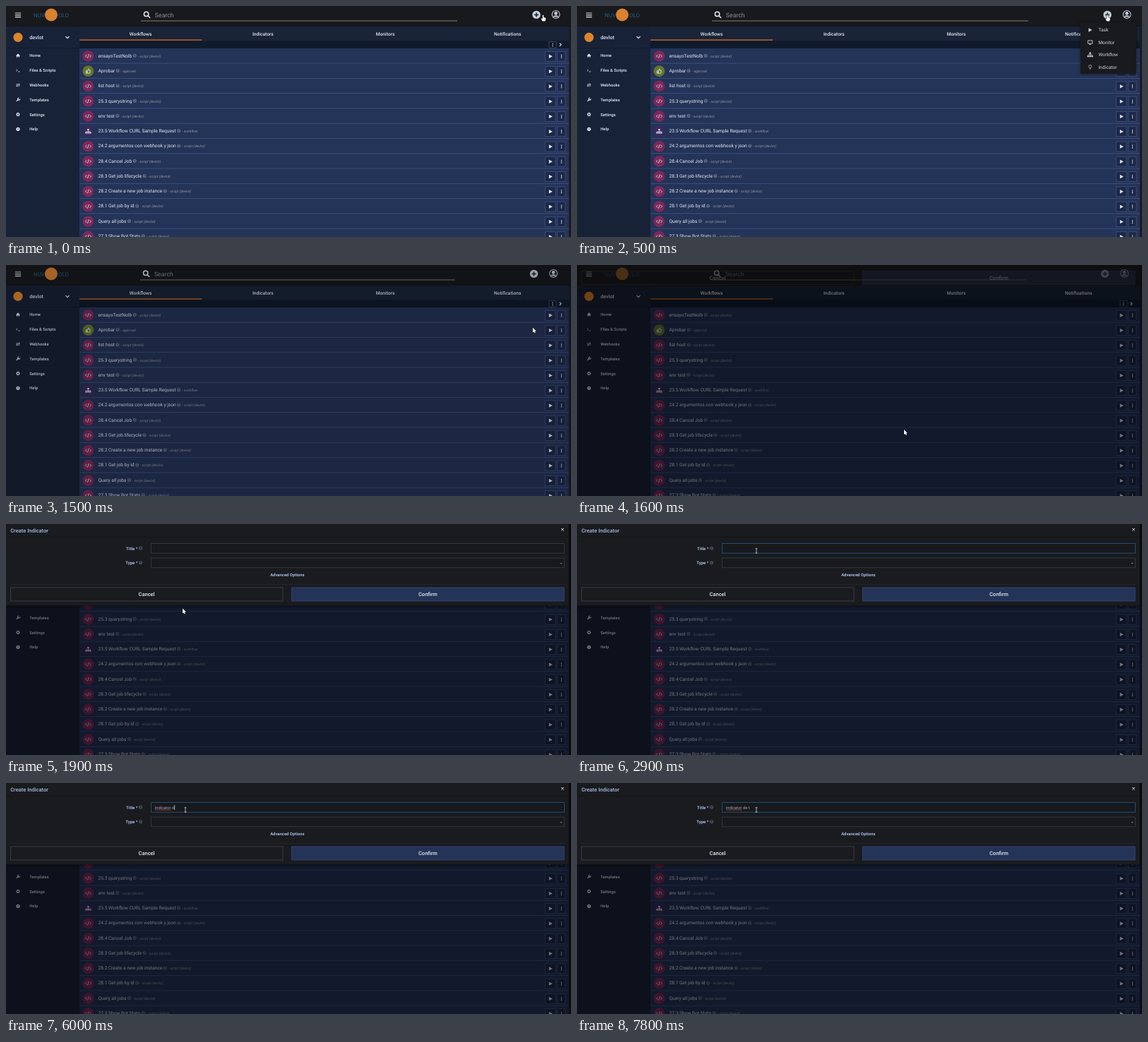
Animation, 800 px wide and 327 px high, one loop 8000 ms. Source, as an HTML page with a canvas:

```html
<!DOCTYPE html>
<html lang="es">
<meta charset="utf-8">
<title>Create Indicator</title>
<style>
html, body { margin: 0; width: 100%; height: 100%; overflow: hidden; background: #18191c }
canvas { display: block; width: 800px; height: 327px }
</style>
<canvas id="stage" width="800" height="327"></canvas>
<script>
const c = document.getElementById('stage').getContext('2d');
c.textRendering = 'geometricPrecision';
const LOOP = 8000, STEP = 100, WHITE = '#e3e8f2', ROW_H = 21.28;
const clamp = v => Math.max(0, Math.min(1, v));

const ROWS = [
  ['ensayoTestNolb'], ['Aprobar', 'approval'], ['list host'], ['25.3 querystring'], ['env test'],
  ['23.5 Workflow CURL Sample Request', 'workflow'], ['24.2 argumentos con webhook y json'],
  ['28.4 Cancel Job'], ['28.3 Get job lifecycle'], ['28.2 Create a new job instance'],
  ['28.1 Get job by id'], ['Query all jobs'], ['27.3 Show Bot Stats']
];
const KINDS = { script: '#7c2959', approval: '#66752f', workflow: '#3a2a5e' };

// Small icons, centred on 0,0
const ICON = {
  script: { d: 'M-2-2L-4 0L-2 2M2-2L4 0L2 2M.9-2.8L-.9 2.8', line: .8 },
  approval: { d: 'M-3.2-.4h1.6v3.4h-1.6zM-1.2-.4L.4-3.2Q1.7-3 .9-.9H3L2.4 3H-1.2z', line: .8 },
  workflow: { d: 'M-1.2-3.4h2.4v2.2h-2.4zM-4 1h2.2v2.2h-2.2zM-1.1 1h2.2v2.2h-2.2zM1.8 1h2.2v2.2h-2.2zM-3.2-.4h6.4v.6h-6.4zM-.3-1.3h.6V1h-.6z' },
  play: { d: 'M-2.2-2.7L2.8 0L-2.2 2.7z' },
  dots: { d: 'M-.6-2.5h1.2v1.2h-1.2zM-.6-.6h1.2v1.2h-1.2zM-.6 1.3h1.2v1.2h-1.2z' },
  home: { d: 'M0-2.7L3 0H2.1V2.4H.6V.8H-.6V2.4H-2.1V0H-3z' },
  prompt: { d: 'M-2.5-1.6L-.9 0L-2.5 1.6M0 1.9H2.7', line: .7 },
  swap: { d: 'M-2.5-1H2M1-2.2L2.4-1L1 .1M2.5 1.2H-2M-1 0L-2.4 1.2L-1 2.4', line: .8 },
  wrench: { d: 'M-2.2 2.2L.8-.8M2.6-1.2A1.5 1.5 0 1 1 1.2-2.5', line: 1.2 },
  gear: { d: 'M1.6 0A1.6 1.6 0 1 1-1.6 0A1.6 1.6 0 1 1 1.6 0M0-2.7V-2M0 2.7V2M-2.7 0H-2M2.7 0H2M-1.9-1.9L-1.3-1.3M1.9 1.9L1.3 1.3M1.9-1.9L1.3-1.3M-1.9 1.9L-1.3 1.3', line: 1.1 },
  monitor: { d: 'M-3.2-2.6H3.2V1.6H-3.2zM-1.4 2.8H1.4M0 1.6V2.8', line: .9 },
  bulb: { d: 'M-.8 1.2Q-2-.2-1.8-1.2A1.8 1.8 0 0 1 1.8-1.2Q2-.2.8 1.2zM-.8 2.2H.8M-.4 3H.4', line: .7 },
  down: { d: 'M-2.6-1.2L0 1.4L2.6-1.2', line: 1.2 },
  next: { d: 'M-1.2-2.2L1 0L-1.2 2.2', line: 1.1 },
  close: { d: 'M-1.6-1.6L1.6 1.6M1.6-1.6L-1.6 1.6', line: 1.1 },
  menu: { d: 'M-4.2-2.8H4.2M-4.2 0H4.2M-4.2 2.8H4.2', line: 1.2 },
  search: { d: 'M2.3-.9A3.2 3.2 0 1 1-4.1-.9A3.2 3.2 0 1 1 2.3-.9M1.4 1.5L4.6 4.6', line: 1.5 },
  plus: { d: 'M-3 0H3M0-3V3', line: 1.5 },
  beam: { d: 'M-1.4-3.2H1.4M-1.4 3.2H1.4M0-3.2V3.2', line: .8 }
};
for (const k in ICON) ICON[k].path = new Path2D(ICON[k].d);
const ARROW = new Path2D('M0 0V7.2L1.7 5.7L2.8 8L4 7.4L2.9 5.2H5.1z');
const HAND = new Path2D('M-.8 0Q0-.8.8 0V3L3.4 3.8Q4 4.2 3.8 6L3 8.4H-1L-2.8 5.2Q-2.8 4-.8 5.2z');

function icon(name, x, y, color = WHITE) {
  const { path, line } = ICON[name];
  c.save();
  c.translate(x, y);
  c.lineWidth = line;
  c.fillStyle = c.strokeStyle = color;
  line ? c.stroke(path) : c.fill(path);
  c.restore();
}
function rect(x, y, w, h, fill, border) {
  if (fill) { c.fillStyle = fill; c.fillRect(x, y, w, h); }
  if (border) { c.strokeStyle = border; c.lineWidth = .8; c.strokeRect(x, y, w, h); }
}
function disc(x, y, r, color) {
  c.fillStyle = color;
  c.beginPath();
  c.arc(x, y, r, 0, 7);
  c.fill();
}
// Draws text centred vertically on y and returns its width
function text(s, x, y, size, color = WHITE, style = '400', align = 'left') {
  c.font = `${style} ${size}px Roboto, sans-serif`;
  c.textAlign = align;
  c.fillStyle = color;
  c.fillText(s, x, y + size * .355);
  return c.measureText(s).width;
}
function help(x, y, color, mark) {
  disc(x, y, 2.6, color);
  text('?', x, y, 4, mark, '700', 'center');
}

function topBar(shift) {
  rect(0, 0, 800, 28.5, '#18191c');
  icon('menu', 17, 12.8);
  text('NUV', 39, 12.8, 8, '#215f88');
  disc(64, 12.5, 9, '#d9812f');
  text('OLO', 74, 12.8, 8, '#215f88');
  icon('search', 199.5 - shift / 4, 12.3);
  text('Search', 210.8 - shift / 4, 12.8, 8.75, '#8b8d91');
  rect(191 - shift / 4, 20.6, 448 - shift * .7, .9, '#94897c');
  disc(751 - shift, 12.4, 5.7, '#c6cfdf');
  icon('plus', 751 - shift, 12.4, '#18191c');
  const x = 778.6 - shift;
  disc(x, 12, 6, '#c6cfdf');
  disc(x, 12, 4.9, '#18191c');
  disc(x, 10.4, 2.3, '#c6cfdf');
  c.beginPath();
  c.ellipse(x, 15.6, 3.7, 2.3, 0, Math.PI, 0);
  c.fill();
}

function sideBar() {
  rect(0, 28.5, 104, 299, '#182237');
  rect(0, 28, 800, .8, '#0c0f15');
  rect(0, 59, 104, .8, '#111a2a');
  disc(17, 44.3, 6.6, '#dc8529');
  text('devlot', 33.3, 44.3, 7.1, WHITE, '500');
  icon('down', 87, 44.3);
  const items = ['Home', 'Files & Scripts', 'Webhooks', 'Templates', 'Settings', 'Help'];
  const icons = ['home', 'prompt', 'swap', 'wrench', 'gear'];
  items.forEach((s, i) => {
    const y = 70.2 + i * 20.83;
    i < 5 ? icon(icons[i], 17, y) : help(17, y, WHITE, '#182237');
    text(s, 33.2, y, 5.83, WHITE, '500');
  });
}

function list() {
  rect(104, 28.8, 693, 21, '#192438');
  rect(104, 49.5, 693, 10.5, '#101a2c');
  ['Workflows', 'Indicators', 'Monitors', 'Notifications'].forEach((s, i) =>
    text(s, 190.6 + i * 173.2, 39.2, 6.67, WHITE, '500', 'center'));
  rect(104, 47.4, 173.3, 1.4, '#c9661f');
  rect(769, 50.6, 10, 8.6, '#0c1422', '#44516c');
  icon('dots', 774, 55);
  icon('next', 785, 54.8);
  rect(104, 60, 693, 267, '#243358');
  ROWS.forEach(([title, kind = 'script'], i) => {
    const y = 70.3 + i * ROW_H;
    rect(104, y + 10.4, 693, .8, '#42557f');
    disc(116.4, y + .6, 7.9, KINDS[kind]);
    icon(kind, 116.4, y + .6);
    const end = 130.4 + text(title, 130.4, y, 6.67);
    help(end + 4, y, '#5b6780', '#243358');
    text('- ' + kind + (kind == 'script' ? ' (devlot)' : ''), end + 8.6, y + .6, 5, '#9599a0', 'italic 400');
    rect(763.6, y - 6, 14.4, 14, '#1c2848', '#40527c');
    icon('play', 771, y + 1);
    rect(780.8, y - 6, 11.2, 14, '#1c2848', '#40527c');
    icon('dots', 786.5, y + 1);
  });
  rect(797, 28.8, 3, 299, '#191b20');
}

function dropMenu(pointerY) {
  c.save();
  c.shadowColor = '#0008';
  c.shadowBlur = 4;
  rect(713, 23.5, 79, 72.5, '#191a1d');
  c.restore();
  const items = [['play', 'Task'], ['monitor', 'Monitor'], ['workflow', 'Workflow'], ['bulb', 'Indicator']];
  items.forEach(([sign, s], i) => {
    const y = 34 + i * 17.5;
    if (Math.abs(pointerY - y) < 8.7) rect(713, y - 8.7, 79, 17.4, '#111215');
    icon(sign, 726.6, y, '#d0d4dc');
    text(s, 738.3, y, 6.67, '#d0d4dc');
  });
}

// [time, text] as the keys are pressed; the caret goes out at each time in OFF
const PHRASE = 'indicator de t';
const KEYS = [3300, 3500, 4400, 4500, 4700, 4900, 5100, 5500, 5600, 5800, 6000, 6600, 6900, 7300];
const FOCUS = 2400, OFF = [2900, 3700, 6500, 7800];

function modal(t) {
  const p = clamp((t - 1550) / 300);
  if (!p) return;
  c.save();
  c.globalAlpha = clamp(p * 1.5);
  c.translate(0, -117 * (1 - p) ** 2);
  c.shadowColor = '#000a';
  c.shadowBlur = 5;
  rect(0, -2, 797, 117.5, '#191b1e');
  c.shadowBlur = 0;
  const blue = '#a9bbe3', edge = '#393c41';
  text('Create Indicator', 6.2, 9.2, 7.5, blue, '500');
  icon('close', 788, 8, '#d5d8de');
  rect(0, 18, 797, .7, '#121417');
  ['Title *', 'Type *'].forEach((s, i) => {
    const y = 34.4 + i * 20.6;
    text(s, 186.5, y, 6, blue, '700', 'right');
    help(190.6, y - .2, '#424a5a', '#191b1e');
    rect(205.4, y - 6.8, 585, 13.6, '#17191c', !i && t >= FOCUS ? '#245a8c' : edge);
  });
  c.fillStyle = '#8b9098';
  c.fill(new Path2D('M784.6 55h3l-1.5 1.7z'));
  text('Advanced Options', 398.3, 72.2, 5.9, blue, '700', 'center');
  rect(6, 85, 785, .7, '#2b2d31');
  rect(6.4, 90, 385.6, 19, null, '#42454a');
  text('Cancel', 199, 99.4, 7.5, WHITE, '500', 'center');
  rect(404.6, 90, 385.6, 19, '#243358', '#38497a');
  text('Confirm', 597.4, 99.4, 7.5, WHITE, '500', 'center');

  const pressed = KEYS.filter(k => k <= t);
  const w = text(PHRASE.slice(0, pressed.length), 210.8, 34.6, 5.83, '#a3a7ad');
  const lastKey = pressed.pop() || FOCUS;
  if (t >= FOCUS && !OFF.some(o => o > lastKey && o <= t)) rect(211 + w, 31.3, .7, 6.6, '#d5d8de');
  if (t >= 5800) {
    c.strokeStyle = '#c8453d';
    c.lineWidth = .8;
    c.beginPath();
    for (let x = 0; x <= 22.5; x += .5) c.lineTo(211 + x, 38.2 + .4 * Math.sin(x * 3));
    c.stroke();
  }
  c.restore();
}

const PATH = [
  [0, 760.5, 13], [100, 757, 12.5], [300, 752, 12], [500, 751, 13], [1300, 745.8, 88.5], [1500, 745.8, 88.5],
  [1600, 463, 233], [1700, 345, 190], [1800, 275, 144], [1900, 250, 119.5], [2200, 253, 43], [2300, 254, 38]
];
function pointerAt(t) {
  const i = PATH.findIndex(k => k[0] > t);
  if (i < 0) return PATH.at(-1).slice(1);
  const [a, x, y] = PATH[i - 1], [b, u, v] = PATH[i], f = (t - a) / (b - a);
  return [x + (u - x) * f, y + (v - y) * f];
}
function pointer(t, x, y) {
  if (t >= 2300) return icon('beam', x, y, '#d5d8de');
  const shape = t < 600 ? HAND : ARROW;
  c.save();
  c.translate(x, y);
  c.lineWidth = 1;
  c.strokeStyle = '#000';
  c.stroke(shape);
  c.fillStyle = '#fff';
  c.fill(shape);
  c.restore();
}

function draw(now) {
  const t = Math.floor(now % LOOP / STEP) * STEP;
  const [x, y] = pointerAt(t);
  topBar(t < 1500 ? 0 : 3.5);
  sideBar();
  list();
  if (t >= 500 && t < 1500) dropMenu(y);
  rect(0, 0, 800, 327, `rgba(0,0,0,${.5 * clamp((t - 1430) / 150)})`);
  modal(t);
  pointer(t, x, y);
  requestAnimationFrame(draw);
}
requestAnimationFrame(draw);
</script>
</html>
```
